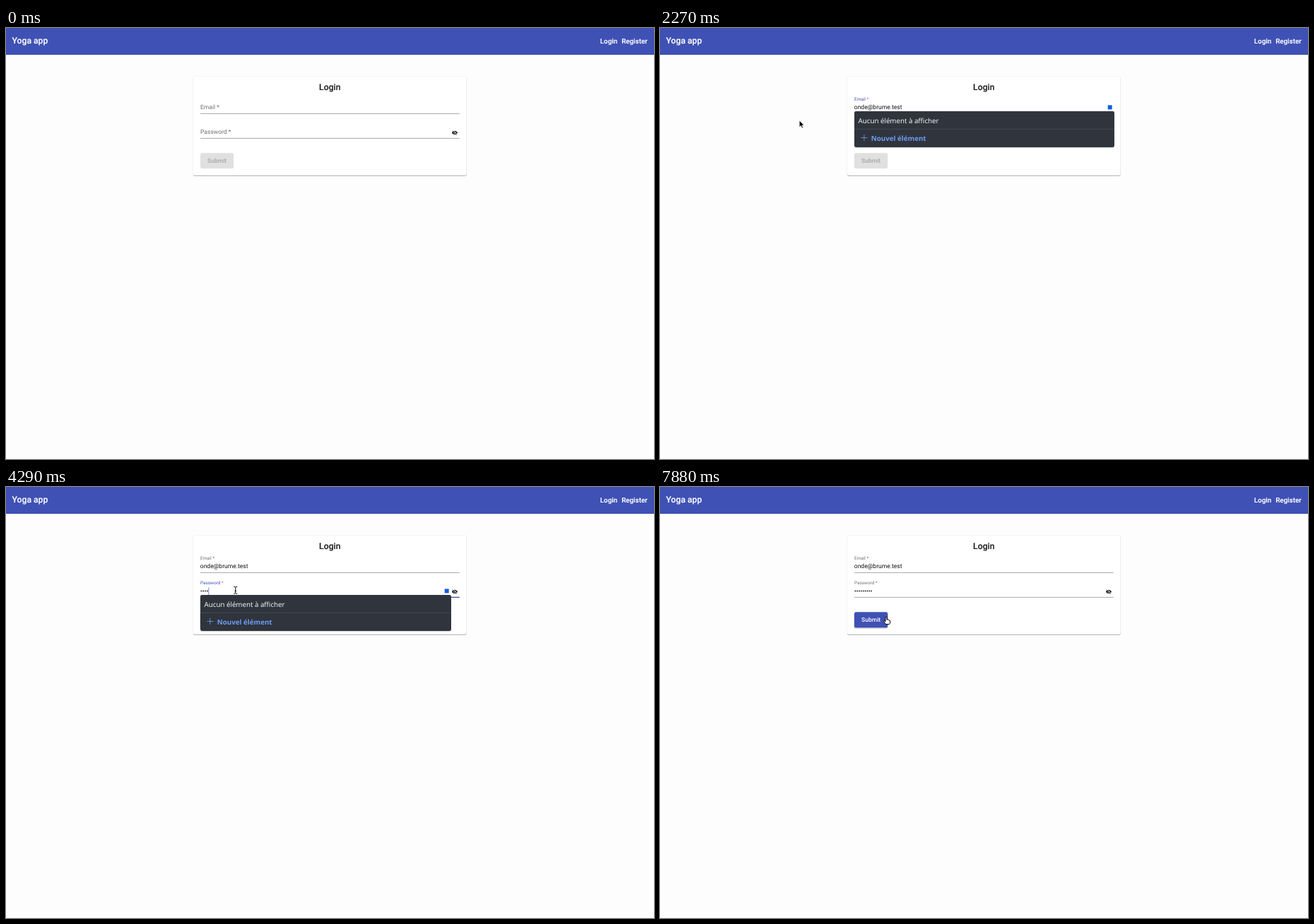
These frames come from a looping animation (917 px wide and 611 px high, 8 s). An HTML page:

```html
<!DOCTYPE html>
<html lang="fr">
<head>
<meta charset="utf-8">
<title>Login form</title>
<style>
  html, body { margin: 0; width: 100%; height: 100%; overflow: hidden; background: #fdfdfd; }
  svg { display: block; width: 100%; height: 100%; }
  text { font: 8.54px Roboto, sans-serif; text-rendering: geometricPrecision; white-space: pre; }
  .title { font-size: 12.2px; font-weight: 500; fill: #212121; stroke: #212121; stroke-width: .15; }
  .link { font-size: 9.8px; font-weight: 500; }
  .light { fill: #fff; stroke: #fff; stroke-width: .15; }
  .label { fill: rgba(0, 0, 0, .56); }
  .focused .label { fill: #3f51b5; }
  .focused .label tspan { fill: #ff4081; }
  .submit { fill: #a6a6a6; }
  .submit text { font-weight: 500; }
  .submit .face { fill: #e0e0e0; }
  .submit .shade { fill: none; }
  .enabled { fill: #fff; }
  .enabled .face { fill: #3f51b5; }
  .enabled .shade { fill: rgba(0, 0, 0, .28); }
  .panel text { font: 9.77px "Open Sans", sans-serif; fill: #fff; }
  .panel .new { font-weight: 700; fill: #6f9df1; }
</style>
</head>
<body>
<svg viewBox="0 0 917 611">
  <rect width="917" height="611" fill="#fdfdfd"/>
  <rect width="917" height="38" fill="#3f51b5"/>
  <text class="title light" x="8.5" y="22.2">Yoga app</text>
  <text class="link light" x="840.8" y="21.7">Login</text>
  <text class="link light" x="871.2" y="21.7">Register</text>

  <rect x="264.6" y="68.4" width="387.5" height="141.4" rx="2.8" fill="#e6e6e6"/>
  <rect x="265" y="70" width="386.7" height="140" rx="2.4" fill="#b4b4b4"/>
  <rect x="265" y="68.7" width="386.7" height="140.3" rx="2.4" fill="#fff"/>
  <text class="title" x="458.3" y="88.3" text-anchor="middle">Login</text>
  <g id="fields"></g>
  <g transform="translate(635 148.4) scale(.35)">
    <path d="M-11.5 0Q-7.5-7.5 0-7.5T11.5 0Q7.5 7.5 0 7.5T-11.5 0Z"/>
    <circle r="5" fill="#fff"/>
    <circle r="3"/>
    <path d="M-7.5-9.5L10 8" stroke="#fff" stroke-width="2.6"/>
    <path d="M-9.5-8.5L8.5 9.5" stroke="#000" stroke-width="1.9"/>
  </g>
  <g id="submit">
    <rect class="shade" x="274.6" y="178.2" width="48" height="22.3" rx="2.6"/>
    <rect class="face" x="275" y="177.3" width="47.2" height="22" rx="2.4"/>
    <text x="298.6" y="191.4" text-anchor="middle">Submit</text>
  </g>
  <g id="panels"></g>

  <g id="cursor">
    <path id="arrow" d="M0 0V9.5L2.2 7.5 3.7 11 5.3 10.3 3.8 6.9H6.8Z" stroke="#fff" stroke-width=".7"/>
    <g id="beam" fill="none">
      <use href="#beamShape" stroke="#fff" stroke-width="2"/>
      <use href="#beamShape" stroke="#000"/>
    </g>
    <path id="hand" d="M-1 7V1Q-1 0 0 0T1 1V4.2Q1.2 3.6 2 3.8T2.8 4.6Q3.2 4 3.8 4.3T4.5 5.2Q5.6 4.9 5.6 6V8Q5.4 9.5 4.6 10.6H-.4Q-1.5 9-3.6 6.6-3.5 5.4-2.2 5.9Z" fill="#fff" stroke="#000"/>
  </g>
  <defs>
    <path id="beamShape" d="M-2.5-5Q-.4-5 0-4Q.4-5 2.5-5M0-4V4M-2.5 5Q-.4 5 0 4Q.4 5 2.5 5M-1.2 1H1.2"/>
  </defs>
</svg>
<script>
const LOOP = 8000, TICK = 120, PHASE = 80;
const ROW = 35, DOT = 2.83, BLINK = 480;
const PASTE = 1760;

const $ = id => document.getElementById(id);
const clamp = v => Math.min(1, Math.max(0, v));
const easeOut = (u, power) => 1 - (1 - clamp(u)) ** power;
const show = (el, on) => el.setAttribute('visibility', on ? 'visible' : 'hidden');

const fields = [
  { name: 'Email', focus: 1390, blur: 2360, panelWidth: 368,
    value: '<text x="274.8" y="115.4" fill="#111">onde@brume.test</text>' },
  { name: 'Password', focus: 3020, blur: 7400, panelWidth: 355,
    value: `<path fill="none" stroke="#111" stroke-width="1.8" stroke-linecap="round" stroke-dasharray="0 ${DOT}"/>` }
];

// Each stop is reached at a time, after a glide from the stop before it.
const entry = { x: 909, y: 41 };
const stops = [
  { at: 1280, glide: 840, x: 339.5, y: 114, shape: 'beam' },
  { at: 2240, glide: 360, x: 197.2, y: 131, shape: 'arrow' },
  { at: 2720, glide: 360, x: 324.8, y: 146.3, shape: 'beam' },
  { at: 7280, glide: 360, x: 577, y: 388, shape: 'arrow' },
  { at: 7760, glide: 360, x: 344.5, y: 174, shape: 'arrow' },
  { at: 7880, glide: 120, x: 320, y: 184, shape: 'hand' }
];

// The password is typed as a fast burst, one lone key, then a slower burst.
const burst = (at, count, gap) => Array.from({ length: count }, (_, i) => at + i * gap);
const keys = [...burst(3920, 4, 120), ...burst(5000, 1, 0), ...burst(5600, 4, 240)];

$('fields').innerHTML = fields.map((f, i) => `
  <g transform="translate(0 ${i * ROW})">
    <path d="M275 121.4H641.8" stroke="#949194" stroke-width=".8"/>
    <path class="ripple" d="M-183.4 0H183.4" stroke="#3f51b5" stroke-width="1.3"/>
    <text class="label">${f.name}<tspan> *</tspan></text>
    <g class="value">${f.value}</g>
    <path class="caret" d="M0 107.2V118" stroke="#3f51b5" stroke-width=".7"/>
  </g>`).join('');

$('panels').innerHTML = fields.map((f, i) => `
  <g class="panel" transform="translate(275 ${118 + i * ROW})">
    <rect x="${f.panelWidth - 9.3}" y="-8.6" width="6" height="6" fill="#175ddc"/>
    <rect y=".6" width="${f.panelWidth}" height="51.2" rx="2.4" fill="rgba(0,0,0,.25)"/>
    <rect width="${f.panelWidth}" height="51" rx="2.4" fill="#2f343d"/>
    <path d="M0 25.3h${f.panelWidth}" stroke="#4c525f" stroke-width=".7"/>
    <text x="5.6" y="17">Aucun élément à afficher</text>
    <path d="M9.3 37.5h9.2M13.9 32.9v9.2" stroke="#6f9df1" stroke-width=".8"/>
    <text class="new" x="23.8" y="42">Nouvel élément</text>
  </g>`).join('');

fields.forEach((f, i) => {
  f.root = $('fields').children[i];
  f.panel = $('panels').children[i];
  for (const part of ['ripple', 'label', 'value', 'caret']) f[part] = f.root.querySelector('.' + part);
});

function drawField(f, t, filled, typed, lastInput) {
  const focused = t >= f.focus && t < f.blur;
  const age = t - f.focus;
  const lift = focused || filled ? easeOut(age / 400, 5.3) : 0;
  const caretOn = (t - lastInput) % (2 * BLINK) < BLINK;
  f.root.setAttribute('class', focused ? 'focused' : '');
  f.label.setAttribute('transform', `translate(275 ${115.4 - 12.7 * lift}) scale(${1 - .25 * lift})`);
  show(f.value, filled);
  show(f.ripple, focused);
  f.ripple.setAttribute('transform', `translate(458.4 121.3) scale(${.5 + .5 * easeOut(age / 300, 5.3)} 1)`);
  show(f.caret, focused && caretOn);
  f.caret.setAttribute('transform', `translate(${275.5 + typed * DOT} 0)`);
  f.panel.setAttribute('opacity', focused ? clamp(age / 140) : 0);
}

function drawCursor(t) {
  const started = stops.filter(s => t >= s.at - s.glide);
  const stop = started.at(-1);
  const from = started.at(-2) || entry;
  const shape = stop && (t >= stop.at ? stop.shape : 'arrow');
  for (const id of ['arrow', 'beam', 'hand']) show($(id), id === shape);
  if (!stop) return;
  const u = easeOut(1 - (stop.at - t) / stop.glide, 2);
  const between = axis => from[axis] + (stop[axis] - from[axis]) * u;
  $('cursor').setAttribute('transform', `translate(${between('x')} ${between('y')})`);
}

function draw(time) {
  // The screen refreshes only once per tick.
  const t = Math.floor((time - PHASE) / TICK) * TICK + PHASE;
  const [email, password] = fields;
  const pressed = keys.filter(k => t >= k);
  const typed = pressed.length;

  drawField(email, t, t >= PASTE, 0, email.focus);
  drawField(password, t, typed > 0, typed, pressed.at(-1) ?? password.focus);
  password.value.firstChild.setAttribute('d', `M276.4 112.4h${Math.max(0, typed - .9) * DOT}`);
  $('submit').setAttribute('class', typed ? 'submit enabled' : 'submit');
  drawCursor(t);
}

const start = performance.now();
function tick() {
  draw((performance.now() - start) % LOOP);
  requestAnimationFrame(tick);
}
tick();
</script>
</body>
</html>
```
